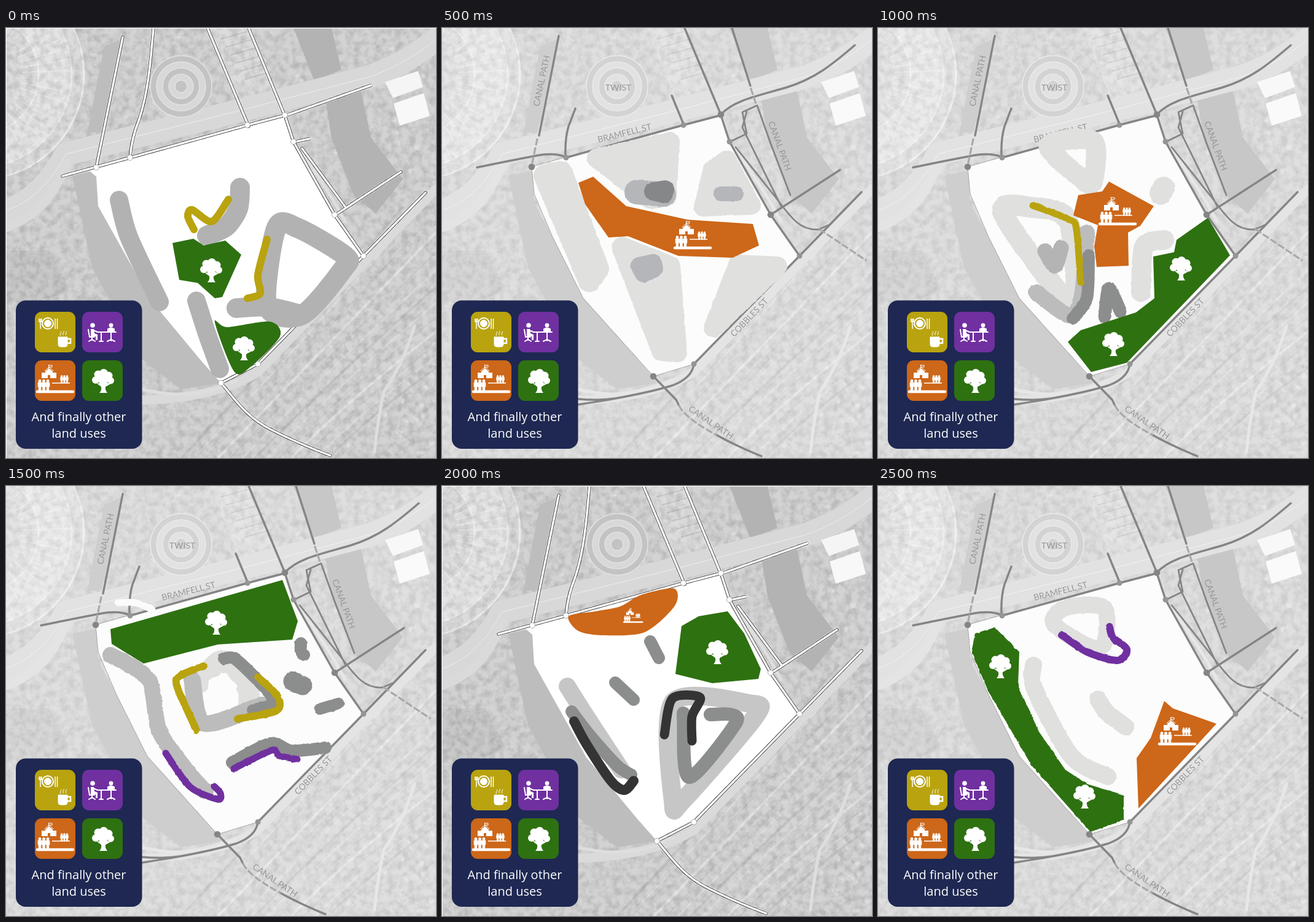
These frames come from a looping animation (700x700 px, 3000 ms). An HTML page:

```html
<!DOCTYPE html>
<html lang="en">
<head>
<meta charset="utf-8">
<title>Land uses</title>
<style>
  html, body { margin: 0; width: 100%; height: 100%; overflow: hidden; background: #d9d9d9; }
  svg { display: block; width: 700px; height: 700px; }
  .hide { display: none; }
  .label { font: 14px Lato, Carlito, sans-serif; fill: #979797; text-anchor: middle; }
  .caption { font: 500 20px "Open Sans", "Noto Sans", sans-serif; fill: #fff; text-anchor: middle; }
  .line { fill: none; stroke-linecap: round; stroke-linejoin: round; }
</style>
</head>
<body>
<svg viewBox="0 0 700 700">
  <defs>
    <filter id="grain" x="0" y="0" width="1" height="1" color-interpolation-filters="sRGB">
      <feTurbulence type="fractalNoise" baseFrequency=".09" numOctaves="4" seed="4"/>
      <feColorMatrix values="1.4 0 0 0 .1  1.4 0 0 0 .1  1.4 0 0 0 .1  0 0 0 0 1"/>
    </filter>
    <filter id="rough" filterUnits="userSpaceOnUse" x="0" y="0" width="700" height="700" color-interpolation-filters="sRGB">
      <feTurbulence type="fractalNoise" baseFrequency=".1" numOctaves="2" seed="3"/>
      <feDisplacementMap in="SourceGraphic" scale="3" xChannelSelector="R" yChannelSelector="G"/>
    </filter>
    <g id="tree" fill="#fff">
      <circle cx="-12" cy="-1" r="6"/><circle cx="-8" cy="-10" r="6.500"/><circle cx="1" cy="-12" r="7"/>
      <circle cx="9" cy="-8" r="6.500"/><circle cx="12.500" cy="0" r="5.500"/><circle cx="0" cy="-3" r="9"/>
      <path d="M-11 4Q-5 6-2 1H5Q8 6 13 5L4 10Q3 15 7 20H-6Q-2 16-3 10Z"/>
    </g>
    <g id="person" fill="#fff">
      <circle cy="-7.500" r="2"/>
      <path d="M-2.800-5H2.800V2H1.700V9H.3V3H-.3V9H-1.700V2H-2.800Z"/>
    </g>
    <g id="trio">
      <use href="#person" x="-6.500"/><use href="#person"/><use href="#person" x="6.500"/>
    </g>
    <g id="school" fill="none" stroke="#fff">
      <path d="M22.500 7V15M23 8H28V11H23M15.500 17.500L23 11L30.500 17.500"/>
      <path d="M11 20H17V18L23 13L29 18V20H35V29H25V24H21V29H11Z" fill="#fff" stroke="none"/>
      <use href="#trio" x="14.500" y="41"/>
      <use href="#trio" transform="translate(48 31) scale(.68)"/>
      <path d="M28 37H57" stroke-width="1.500"/>
      <path d="M4 51H62" stroke-width="4.500" stroke-linecap="round"/>
    </g>
    <g id="food" fill="none" stroke="#fff">
      <circle cx="21" cy="19" r="9" stroke-width="2"/><circle cx="21" cy="19" r="5.500" fill="#fff"/>
      <path d="M9 11V28M7 11V16H11V11M33 11V28M36.500 11V28" stroke-width="1.500"/>
      <path d="M38 41H53V53Q53 57 49 57H42Q38 57 38 53Z" fill="#fff"/>
      <path d="M53 44H58V51H53" stroke-width="2.500"/>
      <path d="M42 39Q40 37 42 35T42 32M46.500 38Q44.500 36 46.500 34T46.500 31M51 38Q49 36 51 34T51 32"/>
    </g>
    <g id="office" fill="none" stroke="#fff" stroke-width="2" stroke-linecap="round">
      <circle cx="17" cy="22" r="2.800" fill="#fff"/><circle cx="47" cy="22" r="2.400" fill="#fff"/>
      <path d="M14 28H19L20 35L25 37V46H22V40H14Z" fill="#fff" stroke="none"/>
      <path d="M10 29L12 41H20M16 41V46M11 48L16 45L21 48M18 30L25 33M26 33H55M31 34V48M28 48H34M47 34V47M41 48L47 45L53 48"/>
      <path d="M42 32V28Q47 25 52 28V32Z" fill="#fff"/>
    </g>
  </defs>
  <g id="stage"></g>
</svg>
<script>
const NS = 'http://www.w3.org/2000/svg';
const GOLD = '#b9a30f', PURPLE = '#7030a0', ORANGE = '#cd6719', GREEN = '#2e7111';
const PALE = '#e0e0df', MID = '#bcbcbc', SLATE = '#b4b6ba', DARK = '#8c8d8d', INK = '#343434';
const LOOP = 3000, STEP = 500;

function add(parent, tag, attrs = {}, text) {
  const el = document.createElementNS(NS, tag);
  for (const k in attrs) el.setAttribute(k, attrs[k]);
  if (text) el.textContent = text;
  parent.append(el);
  return el;
}
const group = (parent, attrs) => add(parent, 'g', attrs);
const line = (g, d, width, color, more) =>
  add(g, 'path', { d, class: 'line', stroke: color, 'stroke-width': width, ...more });
const dot = (g, cx, cy, r, color, more) => add(g, 'circle', { cx, cy, r, fill: color, ...more });
const rect = (g, x, y, width, height, color, more) => add(g, 'rect', { x, y, width, height, fill: color, ...more });
const area = (g, color, points) => add(g, 'polygon', { points, fill: color });
// Polygon grown outwards into round corners
const pad = (g, size, color, points) =>
  add(g, 'polygon', { points, fill: color, stroke: color, 'stroke-width': size, 'stroke-linejoin': 'round' });
const tree = (g, x, y) => add(g, 'use', { href: '#tree', x, y });
const school = (g, x, y, s = 1) => add(g, 'use', { href: '#school', transform: `translate(${x} ${y}) scale(${s})` });

const parse = str => str.split(' ').map(s => s.split(',').map(Number));

// Smooth path through the points
function curve(str, closed) {
  const p = parse(str), n = p.length;
  const at = i => closed ? p[(i + n) % n] : p[Math.max(0, Math.min(n - 1, i))];
  let d = 'M' + p[0];
  for (let i = 0; i < (closed ? n : n - 1); i++) {
    const [a, b, c, e] = [at(i - 1), at(i), at(i + 1), at(i + 2)];
    const c1 = b.map((v, k) => v + (c[k] - a[k]) / 7);
    const c2 = c.map((v, k) => v - (e[k] - b[k]) / 7);
    d += `C${c1} ${c2} ${c}`;
  }
  return d + (closed ? 'Z' : '');
}
const brush = (g, width, color, pts, closed) => line(g, curve(pts, closed), width, color);
const blob = (g, color, pts) => add(g, 'path', { d: curve(pts, true), fill: color });

let seed = 21;
const rnd = () => (seed = seed * 16807 % 2147483647) / 2147483647;

function scatter(g, count, x, y, w, h, turn) {
  for (let i = 0; i < count; i++) {
    const px = x + rnd() * w, py = y + rnd() * h;
    rect(g, px, py, 3 + rnd() * 9, 3 + rnd() * 6, rnd() < .5 ? '#bababa' : '#dedede',
      { opacity: .65, transform: `rotate(${turn} ${px} ${py})` });
  }
}

function drawAerial(g) {
  rect(g, 0, 0, 700, 700, '#cbcbcb');
  area(g, '#bfbfbf', '0,362 72,362 104,428 30,452 0,442');
  scatter(g, 110, 0, 0, 700, 240, -15);
  scatter(g, 150, 510, 455, 190, 245, 38);
  // stadium
  for (const [r, c] of [[172, '#d6d6d6'], [152, '#dfdfdf'], [98, '#d6d6d6']])
    dot(g, -45, 75, r, c, { stroke: '#e9e9e9', 'stroke-width': 3 });
  for (let a = -1; a < 1.7; a += .12) {
    const at = r => `${-45 + r * Math.cos(a)} ${75 + r * Math.sin(a)}`;
    line(g, `M${at(70)}L${at(150)}`, 1, '#efefef');
  }
  area(g, '#d6d6d6', '332,0 392,0 440,105 382,122');
  for (let i = 0; i < 6; i++) line(g, `M${350 + i * 8} ${18 + i * 13}l42 -12`, 2, '#bcbcbc');
  // railway
  area(g, '#cdcdcd', '395,700 700,348 700,505 530,700');
  for (let i = 0; i < 13; i++) {
    const x = 285 + i * 20;
    line(g, `M${x} 700Q${x + 120} 575 ${x + 360} ${292 + i * 12}`, i % 3 ? 1.2 : 4, i % 2 ? '#dfdfdf' : '#bdbdbd');
  }
  rect(g, 0, 0, 700, 700, '#ccc', { filter: 'url(#grain)', opacity: .16 });
  // water
  area(g, '#bdbdbd', '160,30 188,18 156,168 132,172');
  area(g, '#bdbdbd', '108,240 148,232 150,285 235,440 350,578 285,588 222,540 140,390');
  area(g, '#b3b3b3', '468,0 530,0 546,68 502,86');
  area(g, '#b3b3b3', '520,118 578,102 594,178 646,246 602,302 566,272 530,180');
  // roads
  const main = 'M-10 300Q55 285 98 205L390 132L590 80Q655 58 710 10';
  line(g, main, 38, '#d8d8d8');
  line(g, main, 1, '#ededed');
  line(g, 'M0 325Q70 300 98 220M222 606Q345 602 410 560L700 262', 15, '#dadada');
  line(g, 'M220 588Q310 610 375 573M475 195Q520 255 552 315M665 485Q645 550 615 592Q604 645 600 690', 5, '#dedede');
  // round tower plaza
  for (let i = 0; i < 5; i++)
    dot(g, 285, 95, 50 - i * 10, i % 2 ? '#d8d8d8' : '#c3c3c3', { stroke: '#e2e2e2', 'stroke-width': 1.5 });
  // sheds
  area(g, '#f5f5f5', '617,88 671,70 679,96 630,114');
  area(g, '#f8f8f8', '631,123 680,106 690,143 641,159');
}

const EDGE = '202,211 393,158 454,142 468,185 535,304 582,371 410,547';
const dots = (g, pts, r, color, more) => parse(pts).forEach(([x, y]) => dot(g, x, y, r, color, more));

function drawDashedMap(g) {
  area(g, '#fff', `${EDGE} 350,578 318,542 235,442 150,290 147,242 133,230`);
  const d = `M${EDGE} 350,578C370 600 390 633 430 653Q475 676 528 696` +
    'M190 15L147 226M240 0C235 60 231 105 217 148Q204 180 202 211M92 241L202 211M454 143L595 93M328 0L395 160' +
    'M395 0L454 143M467 186L495 180M482 196L553 292M535 305L643 234M582 371L683 268';
  line(g, d, 6.5, '#fff');
  line(g, d, 5.4, '#333', { 'stroke-dasharray': '6 2 1 2', 'stroke-linecap': 'butt' });
  line(g, d, 3.5, '#fff');
  dots(g, `147,227 ${EDGE} 350,578`, 4.5, '#fff', { stroke: '#888', 'stroke-width': .7 });
  line(g, 'M0 0V700M0 0H700', 2, '#fff');
}

function drawStreetMap(g) {
  const street = '#858585', bank = '344,567 230,440 180,340 150,270 146,226';
  rect(g, 0, 0, 700, 700, '#fff', { opacity: .26 });
  area(g, '#fcfcfc', `${EDGE} ${bank}`);
  line(g, `M410,547 ${bank} 201,210`, 1.2, '#999', { 'stroke-dasharray': '1 2' });
  line(g, `M${EDGE}Q407 570 375 582C335 594 275 605 222 613` +
    'M190 13L158 175M57 227Q110 216 158 207Q185 203 201 210M217 131L206 160Q200 180 201 208' +
    'M374 110L393 156M395 0L454 141C475 117 520 109 560 97C610 82 640 55 672 28M472 0L502 94' +
    'M582 371L683 267M535 304L648 231M222 604Q255 607 282 603M344 567L381 605L386 615M446 662Q480 681 520 697', 3.4, street);
  line(g, 'M469 185L496 172L489 137L513 126L535 188L567 272M496 136L489 162L552 290M478 194L545 278C570 312 585 330 613 328L629 321', 2.8, street);
  line(g, 'M155 181L146 224M503 99L512 126M615 328L690 378M386 615Q397 636 446 662', 3.2, '#a9a9a9',
    { 'stroke-dasharray': '9 6', 'stroke-linecap': 'butt' });
  dots(g, EDGE, 4.5, '#959595');
  dots(g, '146,226 454,141 535,304 344,567', 5.3, street);
  const label = (x, y, turn, text) =>
    add(g, 'text', { class: 'label', dy: 5, transform: `translate(${x} ${y}) rotate(${turn})` }, text);
  label(162, 86, -78, 'CANAL PATH');
  label(550, 192, 70, 'CANAL PATH');
  label(438, 642, 34.5, 'CANAL PATH');
  label(297, 171, -14, 'BRAMFELL ST');
  label(500, 471, -46, 'COBBLES ST');
  label(287, 97, 0, 'TWIST');
}

// Each scene: base map, then brush work on b and flat shapes on g
const scenes = [
  ['dashed', (g, b) => {
    const grey = '#b2b2b2';
    brush(b, 30, grey, '184,280 200,340 250,446');
    brush(b, 32, grey, '381,260 378,294 358,324 327,338');
    brush(b, 33, grey, '440,326 476,326 552,371 549,392 482,467 425,452', true);
    brush(b, 32, grey, '375,456 425,454 482,467');
    brush(b, 30, grey, '310,444 328,500 348,555');
    brush(b, 12, GOLD, '306,328 296,307 303,296 335,315 362,279');
    brush(b, 12, GOLD, '425,344 410,402 414,432 393,440');
    area(g, GREEN, '271,350 305,343 322,354 357,346 383,369 352,438 340,440 312,415 282,410');
    blob(g, GREEN, '340,479 360,487 430,478 446,502 400,550 372,560');
    tree(g, 334, 394); tree(g, 387, 521);
  }],
  ['streets', (g, b) => {
    pad(b, 36, PALE, '167,240 194,234 254,392 240,412');
    pad(b, 32, PALE, '252,212 371,185 366,274 340,279');
    pad(b, 30, PALE, '464,214 504,289 425,292 440,230');
    pad(b, 34, PALE, '293,357 371,388 382,528 358,525');
    pad(b, 32, PALE, '482,385 546,388 442,488');
    brush(b, 40, SLATE, '317,267 361,271');
    pad(b, 30, '#858788', '344,266 363,263 361,270');
    brush(b, 24, SLATE, '454,270 479,270');
    pad(b, 28, SLATE, '321,387 344,382 346,392 328,400');
    area(g, ORANGE, '222,252 246,242 300,290 400,312 506,319 516,354 473,374 385,371 303,339 271,341 233,287');
    school(g, 375, 307);
  }],
  ['streets', (g, b) => {
    brush(b, 33, PALE, '278,192 350,184 350,248 335,248', true);
    brush(b, 36, PALE, '465,260 460,270');
    brush(b, 34, PALE, '203,300 250,292 310,315 322,455 290,425', true);
    brush(b, 32, PALE, '466,345 433,356 428,430');
    brush(b, 26, MID, '257,430 312,468 332,435 340,333');
    brush(b, 25, '#b4b4b4', '272,363 288,387 298,358');
    brush(b, 20, DARK, '343,370 340,440 317,473');
    brush(b, 21, DARK, '369,470 376,424 395,462');
    brush(b, 11, GOLD, '252,289 312,312 323,328 330,414');
    area(g, ORANGE, '326,272 365,266 376,250 449,290 427,322 407,333 408,387 356,389 352,355 358,321 318,305');
    school(g, 357, 268);
    area(g, GREEN, '537,309 573,370 405,545 347,560 309,511 330,492 420,463 450,440 448,372 482,365 486,345');
    tree(g, 493, 391); tree(g, 383, 514);
  }],
  ['streets', (g, b) => {
    brush(b, 11, '#fbfbfb', '182,190 210,190 238,201');
    brush(b, 26, MID, '170,275 232,315 250,400 300,470 325,497');
    brush(b, 34, PALE, '316,320 352,284 392,328 395,358');
    brush(b, 28, MID, '303,315 322,386 415,357');
    brush(b, 20, DARK, '355,281 375,283 427,335 433,355 402,365');
    area(b, '#fcfcfc', '330,316 357,304 377,325 371,340 328,340');
    brush(b, 12, GOLD, '322,293 285,308 278,325 310,397');
    brush(b, 12, GOLD, '410,311 442,342 440,366 377,379');
    brush(b, 20, DARK, '480,256 480,268 485,275');
    brush(b, 31, DARK, '467,318 483,325');
    brush(b, 19, DARK, '511,363 541,354');
    brush(b, 20, DARK, '368,450 430,419 465,431 520,426');
    brush(b, 11, PURPLE, '371,460 433,430 445,439 474,445');
    brush(b, 11, PURPLE, '260,435 300,490 345,510 349,500 339,489');
    area(g, GREEN, '170,233 450,153 475,220 466,250 345,258 224,289 172,257');
    tree(g, 342, 222);
  }],
  ['dashed', (g, b) => {
    brush(b, 28, '#c6c6c6', '204,326 235,375 292,462');
    brush(b, 30, '#c6c6c6', '376,352 500,354 510,375 393,511 376,513', true);
    brush(b, 20, DARK, '339,253 353,280');
    brush(b, 20, DARK, '282,320 312,348');
    brush(b, 20, DARK, '211,367 240,405 285,455 308,470');
    brush(b, 22, DARK, '393,370 402,474 477,388 470,372 437,372');
    brush(b, 16, INK, '215,383 235,420 275,480 297,495 312,480');
    brush(b, 15, INK, '362,405 375,346 420,344 407,375 407,415');
    blob(g, ORANGE, '206,212 250,204 290,196 325,177 378,167 379,195 330,238 262,243 222,236');
    school(g, 294, 195, .52);
    area(g, GREEN, '390,228 418,212 465,204 492,240 519,298 515,314 440,321 380,306');
    tree(g, 448, 270);
  }],
  ['streets', (g, b) => {
    brush(b, 27, PALE, '306,198 368,198 369,255 345,262 286,224', true);
    brush(b, 28, PALE, '253,292 255,330 315,440 374,473');
    brush(b, 28, PALE, '358,347 372,368 403,392');
    brush(b, 12, PURPLE, '300,243 340,270 390,284 405,266 382,246 377,229');
    area(b, GREEN, '158,240 190,230 230,270 228,325 262,400 305,462 340,485 400,503 400,544 346,563 250,455 180,335 152,270');
    area(g, ORANGE, '466,350 480,362 551,387 424,525 421,443 444,410');
    school(g, 454, 369);
    tree(g, 199, 293); tree(g, 336, 505);
  }]
];

function drawPanel(g) {
  rect(g, 16, 443.5, 205.5, 241.5, '#1e2852', { rx: 16 });
  const tiles = [['food', GOLD], ['office', PURPLE], ['school', ORANGE], ['', GREEN]];
  tiles.forEach(([icon, color], i) => {
    const x = 47 + i % 2 * 77, y = 462 + (i >> 1) * 79;
    rect(g, x, y, 66, 66, color, { rx: 11 });
    if (icon) add(g, 'use', { href: '#' + icon, x, y });
    else tree(g, x + 34, y + 33);
  });
  add(g, 'text', { class: 'caption', x: 118.5, y: 640 }, 'And finally other');
  add(g, 'text', { class: 'caption', x: 118.5, y: 667 }, 'land uses');
}

const stage = document.getElementById('stage');
drawAerial(group(stage));
const maps = { dashed: group(stage), streets: group(stage) };
drawDashedMap(maps.dashed);
drawStreetMap(maps.streets);
const layers = scenes.map(([map, draw]) => {
  const layer = group(stage);
  const strokes = group(layer, map === 'streets' ? { filter: 'url(#rough)' } : {});
  draw(group(layer), strokes);
  return layer;
});
drawPanel(group(stage));

let shown = -1;
function show(i) {
  if (i === shown) return;
  shown = i;
  layers.forEach((el, k) => el.classList.toggle('hide', k !== i));
  for (const name in maps) maps[name].classList.toggle('hide', name !== scenes[i][0]);
}
const start = performance.now();
function tick() {
  show(Math.floor((performance.now() - start) % LOOP / STEP));
  requestAnimationFrame(tick);
}
tick();
</script>
</body>
</html>
```
